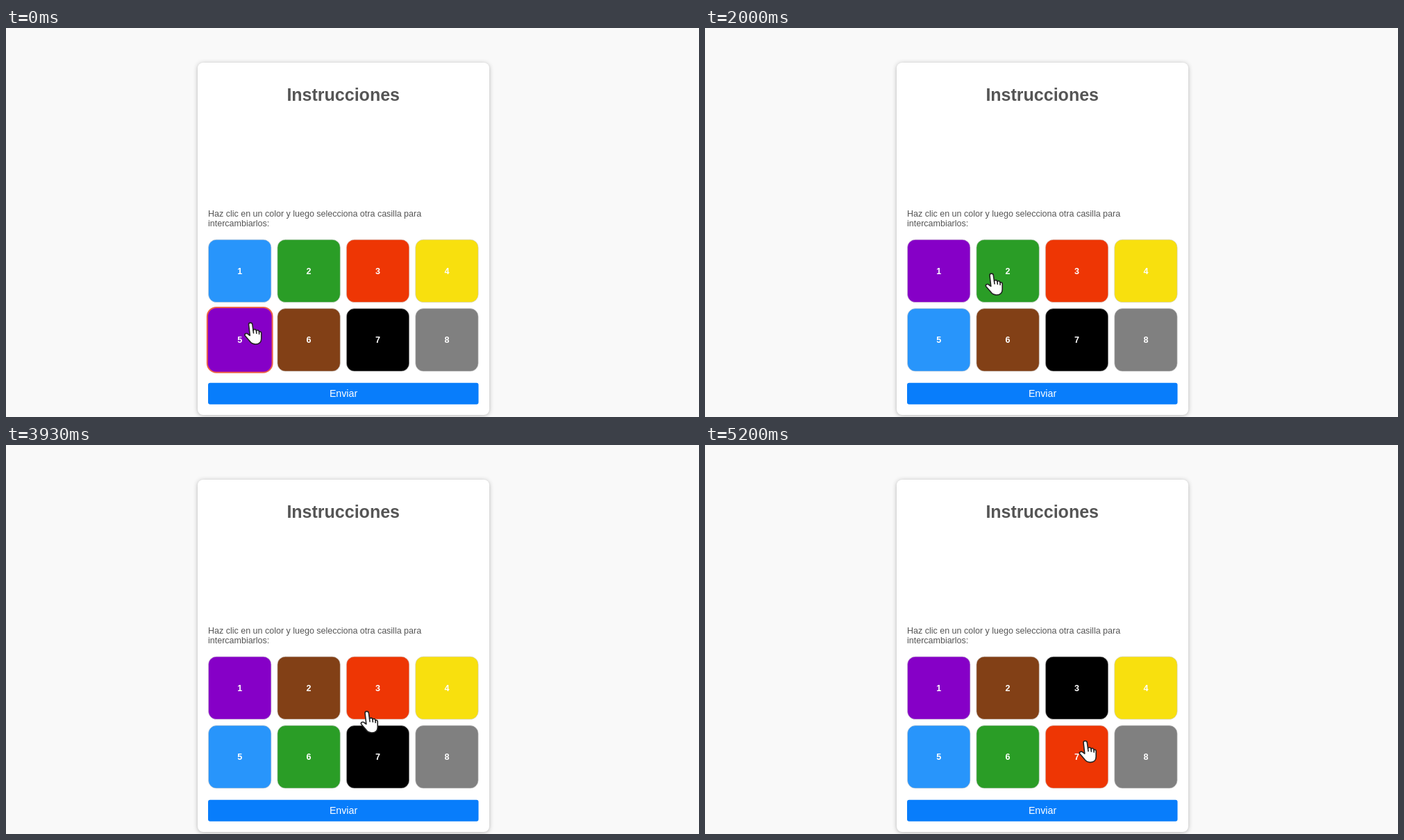
Write an HTML page that moves like this. It is 998 px wide and 561 px high and loops after 5.27 s.

```html
<!DOCTYPE html>
<html lang="es">
<head>
<meta charset="utf-8">
<style>
html, body { margin: 0; width: 100%; height: 100%; overflow: hidden; background: #f9f9f9; }
svg { display: block; font-family: "Liberation Sans", Arial, sans-serif; }
.card { fill: #fff; filter: drop-shadow(0 1px 3px rgba(0, 0, 0, .28)); }
.copy { font-size: 12.5px; fill: #555; }
.title { font-size: 25px; font-weight: bold; }
.mid { text-anchor: middle; }
.num { font-size: 12.5px; font-weight: bold; fill: #fff; }
</style>
</head>
<body>
<svg width="998" height="561" viewBox="0 0 998 561">
  <rect class="card" x="276" y="50" width="420" height="508" rx="8"/>
  <text class="copy title mid" x="485.7" y="104.5">Instrucciones</text>
  <text class="copy" x="291" y="271.5">Haz clic en un color y luego selecciona otra casilla para</text>
  <text class="copy" x="291" y="286">intercambiarlos:</text>
  <g id="tiles"></g>
  <rect x="291" y="511.7" width="389.5" height="31" rx="3" fill="#087dfb"/>
  <text class="mid" x="486" y="532" font-size="14.2" fill="#fff">Enviar</text>
  <g id="hand" stroke="#222" stroke-width="1.6" stroke-linejoin="round" stroke-linecap="round">
    <path fill="#fff" d="M-3 2.5C-3-.7 2-.7 2.3 2.5L3.5 11C4 9 8 9 8 12C9 10 12 10.5 12 13.5C13 12 15.2 13 15.2 15V23C15.2 28 12 31 7 31C2 31 0 29-2 26L-8.5 18.5C-9.5 16-6 14.5-4 16.5L-1.2 18.5Z"/>
    <path fill="none" d="M3.5 11l.5 4M8 12l.3 3.5M12 13.5l.1 3"/>
  </g>
</svg>
<script>
const LOOP = 5270, SIZE = 91.4, PITCH = 99.4;
const colors = ['#2895fb', '#2a9d26', '#ee3604', '#f8e00e', '#8600c7', '#824016', '#000', '#808080'];

// Each swap: first tile, second tile, time selected, time exchanged.
const swaps = [[4, 0, 0, 1030], [1, 5, 2300, 3400], [2, 6, 4200, 5070]];

// Fingertip positions: time, x, y.
const path = [
  [0, 352.5, 425], [300, 352.5, 425], [850, 355, 353], [1200, 355, 353],
  [1900, 413, 354], [2300, 413, 354], [2450, 421, 356], [3150, 437, 416],
  [3600, 437, 416], [3920, 520, 384], [4400, 520, 384], [4900, 548, 427.5], [LOOP, 548, 426.5]
];

const NS = 'http://www.w3.org/2000/svg';
const hand = document.getElementById('hand');
const layer = document.getElementById('tiles');

function add(name, attrs) {
  const el = document.createElementNS(NS, name);
  for (const key in attrs) el.setAttribute(key, attrs[key]);
  return layer.appendChild(el);
}

const tiles = colors.map((_, i) => {
  const x = 291 + i % 4 * PITCH, y = 304.7 + (i >> 2) * PITCH;
  const rect = add('rect', {});
  add('text', { class: 'num mid', x: x + SIZE / 2, y: y + 50 }).textContent = i + 1;
  return { x, y, rect };
});

function paintTile({ x, y, rect }, color, selected) {
  const grow = selected ? 1.2 : -.5;
  const size = SIZE + 2 * grow;
  const attrs = {
    x: x - grow, y: y - grow, width: size, height: size, rx: 12 + grow, fill: color,
    stroke: selected ? '#ec6246' : '#ccc',
    'stroke-width': selected ? 2 : 1,
    'stroke-opacity': selected ? 1 : .6
  };
  for (const key in attrs) rect.setAttribute(key, attrs[key]);
}

function fingertip(t) {
  const i = path.findIndex(p => p[0] > t);
  const [t0, x0, y0] = path[i - 1], [t1, x1, y1] = path[i];
  const u = (t - t0) / (t1 - t0), k = u * u * (3 - 2 * u);
  return [x0 + (x1 - x0) * k, y0 + (y1 - y0) * k];
}

function draw(now) {
  const t = now % LOOP, current = [...colors];
  let selected = -1;
  for (const [a, b, from, to] of swaps) {
    if (t >= to) [current[a], current[b]] = [current[b], current[a]];
    else if (t >= from) selected = a;
  }
  tiles.forEach((tile, i) => paintTile(tile, current[i], i === selected));
  hand.setAttribute('transform', `translate(${fingertip(t)})`);
}

const start = performance.now();
function frame() {
  draw(performance.now() - start);
  requestAnimationFrame(frame);
}
frame();
</script>
</body>
</html>
```
